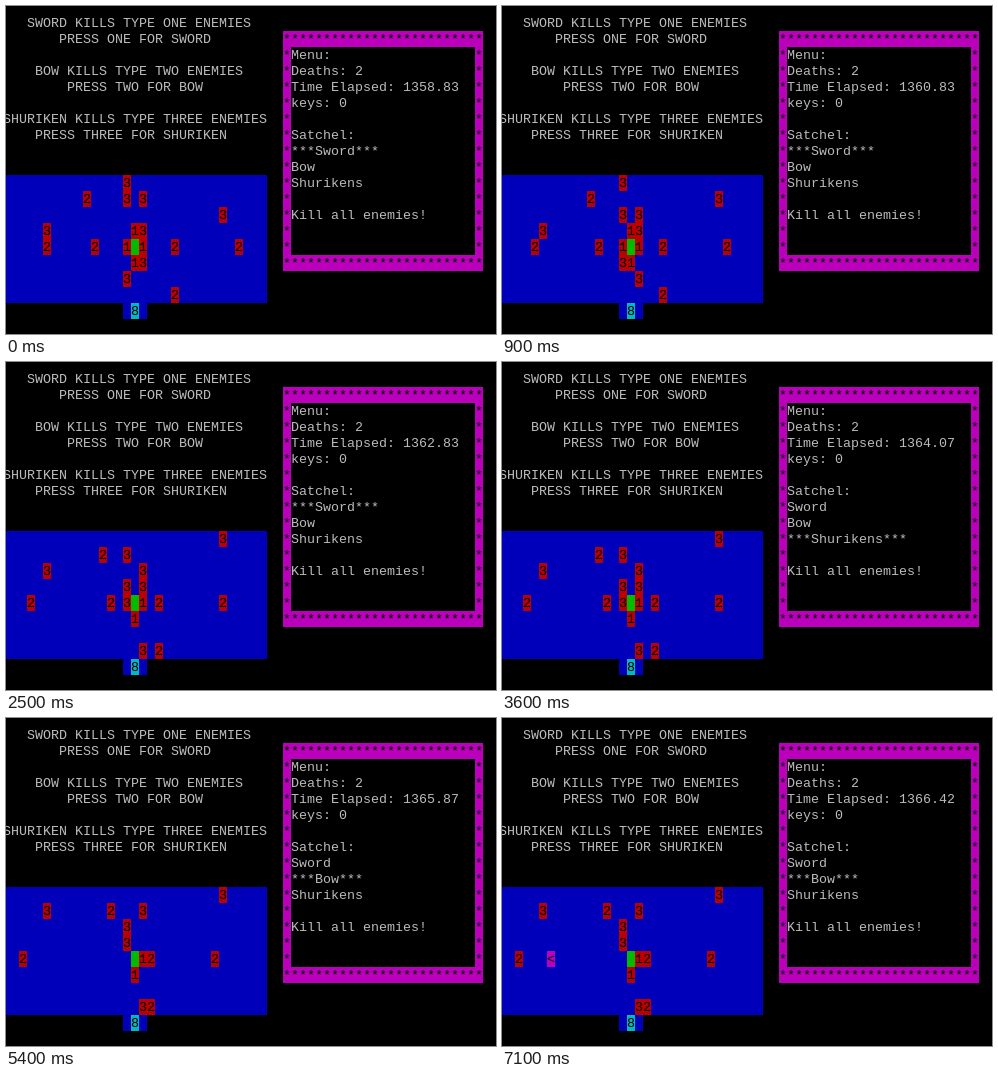
An HTML page that plays this animation: 490x328 px, repeating every 7200 ms.

```html
<!DOCTYPE html>
<html>
<head>
<meta charset="utf-8">
<style>
html, body { margin: 0; width: 100%; height: 100%; overflow: hidden; background: #000; }
#screen { position: absolute; left: 0; top: 0; width: 490px; height: 328px; overflow: hidden; }
#screen div { position: absolute; height: 16px; white-space: pre; font: 13.333px/18px "Liberation Mono", "Courier New", monospace; }
</style>
</head>
<body>
<div id="screen"></div>
<script>
const RED = '#b00', GREEN = '#0b0', BLUE = '#00b', CYAN = '#0bb', MAGENTA = '#b0b', GREY = '#bbb';
const LOOP = 7200, STEPS = [400, 2400, 4400];
const FIELD_TOP = 10, MENU_COL = 35;

// [type, column, row after each step, column change per step, time of death]
const enemies = [
  [3, 14, '0012', 0], [2, 9, '1111', 1], [3, 14, '1233', 0, 4100],
  [3, 16, '1221', 0], [3, 26, '2100', 0], [3, 4, '3321', 0],
  [1, 15, '3333', 0, 1900], [3, 16, '3333', 0, 4100], [2, 4, '4444', -1],
  [2, 10, '4444', 1, 5200], [1, 14, '4444', 0, 1500], [1, 16, '4444', 0],
  [2, 20, '4444', -1], [2, 28, '4444', -1], [1, 15, '5555', 0],
  [3, 16, '5677', 0], [3, 14, '6543', 0], [2, 20, '7777', -1]
];

// [time, value] pairs; the value holds until the next pair
const clock = [[0, '1358.83'], [400, '1360.83'], [1500, '1361.97'], [1900, '1362.37'],
  [2200, '1362.67'], [2400, '1362.83'], [3600, '1364.07'], [4100, '1364.58'],
  [4400, '1364.83'], [4900, '1365.37'], [5200, '1365.87'], [5900, '1366.42']];
const weapon = [[0, 'Sword'], [3600, 'Shurikens'], [4900, 'Bow']];
const ARROW_START = 5900, ARROW_PACE = 130;

const at = (track, t) => track.filter(([start]) => start <= t).pop()[1];

// One run of characters on the 8 x 16 terminal grid
const put = (col, row, text, color = GREY, back = 'none') =>
  `<div style="left:${5 + 8 * col}px;top:${9 + 16 * row}px;color:${color};background:${back}">${text}</div>`;

const cell = (col, row, text, back) => put(col, FIELD_TOP + row, text, '#000', back);

function background() {
  let html = put(2, 0, 'SWORD KILLS TYPE ONE ENEMIES') + put(6, 1, 'PRESS ONE FOR SWORD') +
    put(3, 3, 'BOW KILLS TYPE TWO ENEMIES') + put(7, 4, 'PRESS TWO FOR BOW') +
    put(-1, 6, 'SHURIKEN KILLS TYPE THREE ENEMIES') + put(3, 7, 'PRESS THREE FOR SHURIKEN');
  for (let row = 1; row <= 15; row++) {
    const edge = row === 1 || row === 15;
    html += put(34, row, '*'.repeat(edge ? 25 : 1), '#000', MAGENTA);
    if (!edge) html += put(58, row, '*', '#000', MAGENTA);
  }
  for (let row = 0; row < 8; row++) html += cell(-1, row, ' '.repeat(33), BLUE);
  return html + cell(14, 8, '   ', BLUE) + cell(15, 8, '8', CYAN) + cell(15, 4, ' ', GREEN);
}

function menu(t) {
  const item = name => name === at(weapon, t) ? `***${name}***` : name;
  return ['Menu:', 'Deaths: 2', 'Time Elapsed: ' + at(clock, t), 'keys: 0', '',
    'Satchel:', item('Sword'), item('Bow'), item('Shurikens'), '', 'Kill all enemies!']
    .map((line, i) => put(MENU_COL, 2 + i, line)).join('');
}

function field(t) {
  const step = STEPS.filter(s => s <= t).length;
  let html = '';
  for (const [type, col, rows, dx, death = LOOP] of enemies)
    if (t < death) html += cell(col + dx * step, +rows[step], type, RED);
  if (t >= ARROW_START)
    html += cell(14 - Math.floor((t - ARROW_START) / ARROW_PACE), 4, '&lt;', MAGENTA);
  return html;
}

const screen = document.getElementById('screen');
const base = background();
const begin = performance.now();
let shown = '';

function draw() {
  const t = (performance.now() - begin) % LOOP;
  const html = base + menu(t) + field(t);
  if (html !== shown) screen.innerHTML = shown = html;
  requestAnimationFrame(draw);
}
draw();
</script>
</body>
</html>
```
